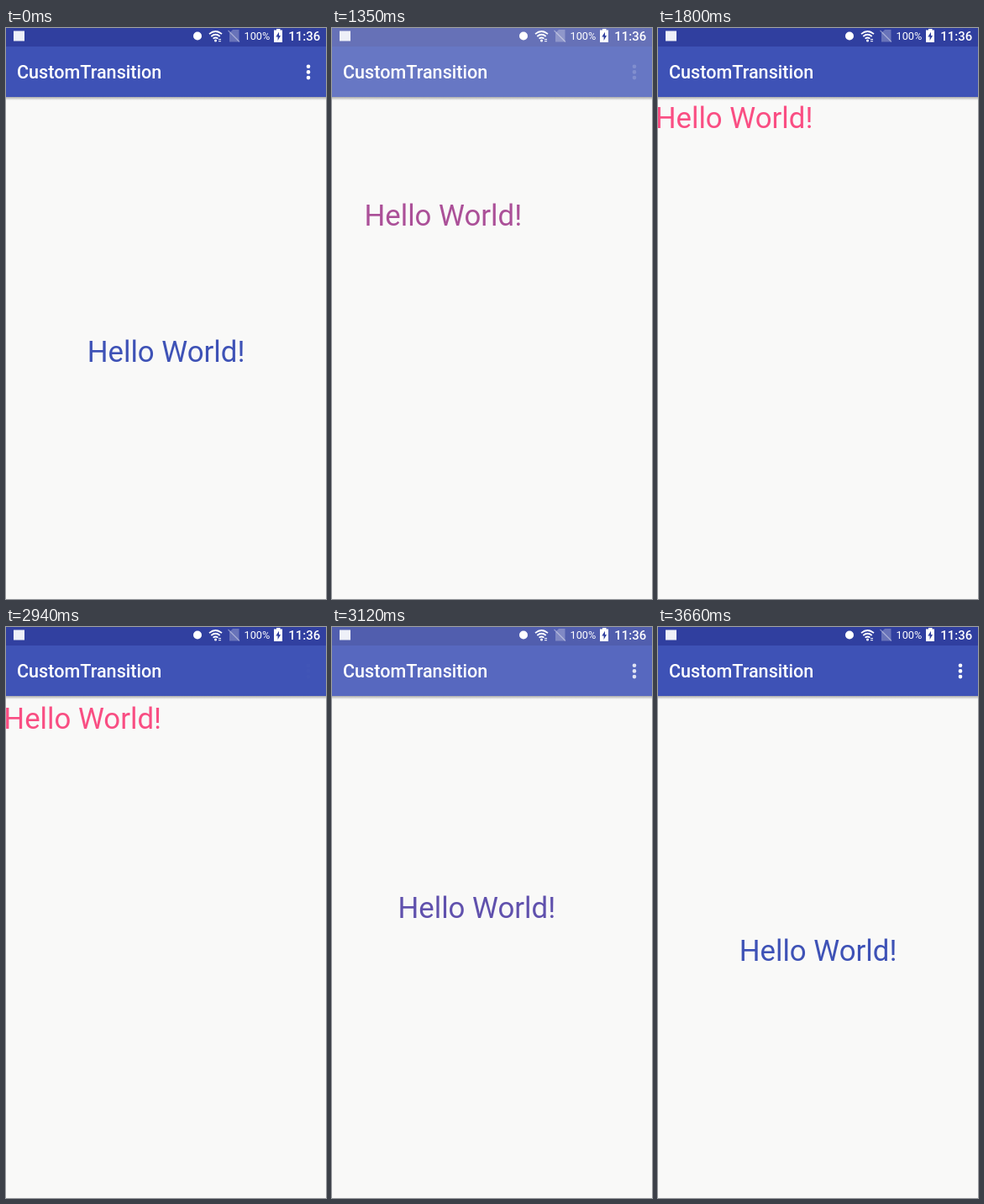
Animation of 381x679 px, one loop 4.23 s. Source, as an HTML page:

```html
<!DOCTYPE html>
<html lang="en">
<head>
<meta charset="utf-8">
<title>CustomTransition</title>
<style>
  html, body { margin: 0; height: 100%; overflow: hidden; background: #f9f9f8; }
  svg { display: block; font-family: Roboto, sans-serif; fill: #fff; }
</style>
</head>
<body>
<svg width="381" height="679" viewBox="0 0 381 679">
  <defs>
    <linearGradient id="shade" x2="0" y2="1">
      <stop stop-color="#222" stop-opacity=".36"/>
      <stop offset="1" stop-color="#222" stop-opacity="0"/>
    </linearGradient>
  </defs>
  <rect width="381" height="679" fill="#f9f9f8"/>
  <rect y="82" width="381" height="4" fill="url(#shade)"/>
  <rect id="toolbar" y="22" width="381" height="60"/>
  <rect id="status" width="381" height="22"/>

  <rect x="9" y="3.5" width="13" height="12" fill="#eef0f8"/>
  <circle cx="228" cy="9.5" r="5"/>
  <path d="M242 7.2Q249.5 .8 257 7.2M244.3 10Q249.5 5.5 254.7 10M246.6 12.7Q249.5 10.3 252.4 12.7"
    fill="none" stroke="#fff" stroke-width="1.7"/>
  <circle cx="249.5" cy="15" r="1.5"/>
  <path d="M253 13.5h3M253 15.7h3" stroke="#fff"/>
  <path d="M270 2h7.500V16.500H266V6Z" opacity=".27"/>
  <path d="M264.500 3L278 16.500" stroke="#fff" stroke-width="1.300" opacity=".4"/>
  <text x="283.500" y="14" font-size="12.700">100%</text>
  <path d="M322 1h4.500v1.600H329V17H319V2.600h3Z"/>
  <path d="M325 4.800L321.300 10.600H323.600V15L327 9H325Z" fill="#303f9f"/>
  <text x="336.300" y="14.600" font-size="14.900" font-weight="500">11:36</text>

  <text x="13" y="60.200" font-size="21.600" font-weight="500">CustomTransition</text>
  <g id="menu">
    <circle cx="360" cy="45.700" r="2.300"/>
    <circle cx="360" cy="52.400" r="2.300"/>
    <circle cx="360" cy="59.100" r="2.300"/>
  </g>
  <text id="hello" font-size="34.800" text-anchor="middle">Hello World!</text>
</svg>
<script>
  const LOOP = 4230, TICK = 30;
  const INDIGO = [62, 82, 182], DARK = [48, 63, 159], PINK = [250, 78, 131], PAPER = [249, 249, 248];
  const [toolbar, status, menu, hello] =
    ['toolbar', 'status', 'menu', 'hello'].map(id => document.getElementById(id));

  const mix = (a, b, k) => `rgb(${a.map((v, i) => Math.round(v + (b[i] - v) * k))})`;

  // cubic-bezier(.4, 0, .2, 1), solved by bisection
  function ease(x) {
    if (x <= 0) return 0;
    if (x >= 1) return 1;
    let lo = 0, hi = 1, s;
    for (let i = 0; i < 24; i++) {
      s = (lo + hi) / 2;
      const bx = 1.2 * s * (1 - s) ** 2 + 0.6 * s * s * (1 - s) + s ** 3;
      if (bx < x) lo = s; else hi = s;
    }
    return s * s * (3 - 2 * s);
  }

  function draw(now) {
    const t = Math.floor(now % LOOP / TICK) * TICK;
    const enter = t >= 1500 ? 1 : ease((t - 1246) / 270);
    const back = ease((t - 2920) / 373);
    const p = enter - back;
    const wash = p * (1 - p); // paper showing through the cross-fade

    toolbar.setAttribute('fill', mix(INDIGO, PAPER, wash * 0.9));
    status.setAttribute('fill', mix(DARK, PAPER, wash * 1.1));
    menu.setAttribute('opacity', back > 0 ? back : (1 - enter) ** 2);
    hello.setAttribute('fill', mix(INDIGO, PINK, p));
    hello.setAttribute('transform', `translate(${190.5 - 100 * p} ${396.8 - 278 * p})`);
    requestAnimationFrame(() => draw(performance.now() - start));
  }

  const start = performance.now();
  draw(0);
</script>
</body>
</html>
```
